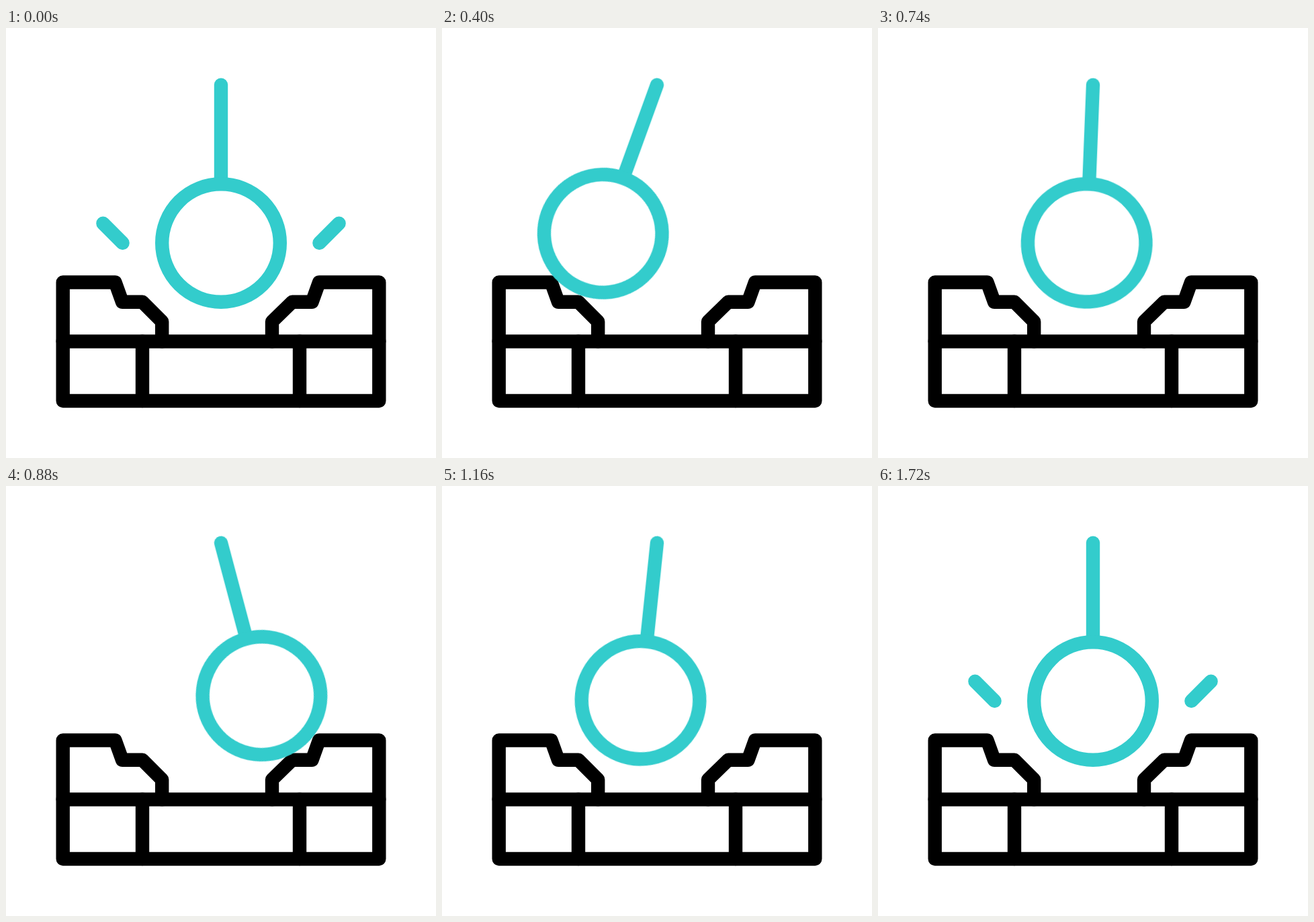
Animation, 640 px wide and 640 px high, one loop 2.4 s. Source, as an HTML page without scripts:

```html
<!DOCTYPE html>
<html lang="en">
<head>
<meta charset="utf-8">
<title>Wrecking ball</title>
<style>
  html, body {
    margin: 0;
    width: 100%;
    height: 100%;
    overflow: hidden;
    background: #fff;
  }
  svg {
    display: block;
    width: 100%;
    height: 100%;
    fill: none;
    stroke-width: 20.4;
    stroke-linecap: round;
    stroke-linejoin: round;
  }
  .wall { stroke: #000; }
  .ball, .rays { stroke: #33cccc; }

  .ball {
    transform-origin: 320px 84.6px;
    animation: swing 2400ms cubic-bezier(.333, 0, .667, 1) infinite;
  }
  .rays path {
    stroke-dasharray: 1 2;
    animation:
      trim 2400ms cubic-bezier(.333, 0, .667, 1) infinite,
      blink 2400ms step-end infinite;
  }

  /* damped swing */
  @keyframes swing {
    0% { transform: rotate(0deg); }
    24.333% { transform: rotate(26deg); }
    36.167% { transform: rotate(-15deg); }
    48% { transform: rotate(6deg); }
    59.833% { transform: rotate(-4deg); }
    71.667%, 100% { transform: rotate(0deg); }
  }
  @keyframes trim {
    0% { stroke-dasharray: 1 2; }
    8.333%, 59.333% { stroke-dasharray: .001 2; }
    71.667%, 100% { stroke-dasharray: 1 2; }
  }
  @keyframes blink {
    0% { opacity: 1; }
    8.333% { opacity: 0; }
    59.5%, 100% { opacity: 1; }
  }
</style>
</head>
<body>
<svg viewBox="0 0 640 640">
  <g class="wall">
    <path d="M84.7 466.5H555.3V555H84.7Z"/>
    <path d="M203 466.5V555M437 466.5V555"/>
    <path d="M84.7 466.5V378.5H162.5L173 407.7H203L232.2 437V466.5"/>
    <path d="M555.3 466.5V378.5H466L455.5 407.7H426L396 437V466.5"/>
  </g>
  <g class="rays">
    <path pathLength="1" d="M173.6 320L144.4 290.7"/>
    <path pathLength="1" d="M466.4 320L495.6 290.7"/>
  </g>
  <g class="ball">
    <path d="M320 84.6V232"/>
    <circle cx="320" cy="320" r="87.8"/>
  </g>
</svg>
</body>
</html>
```
